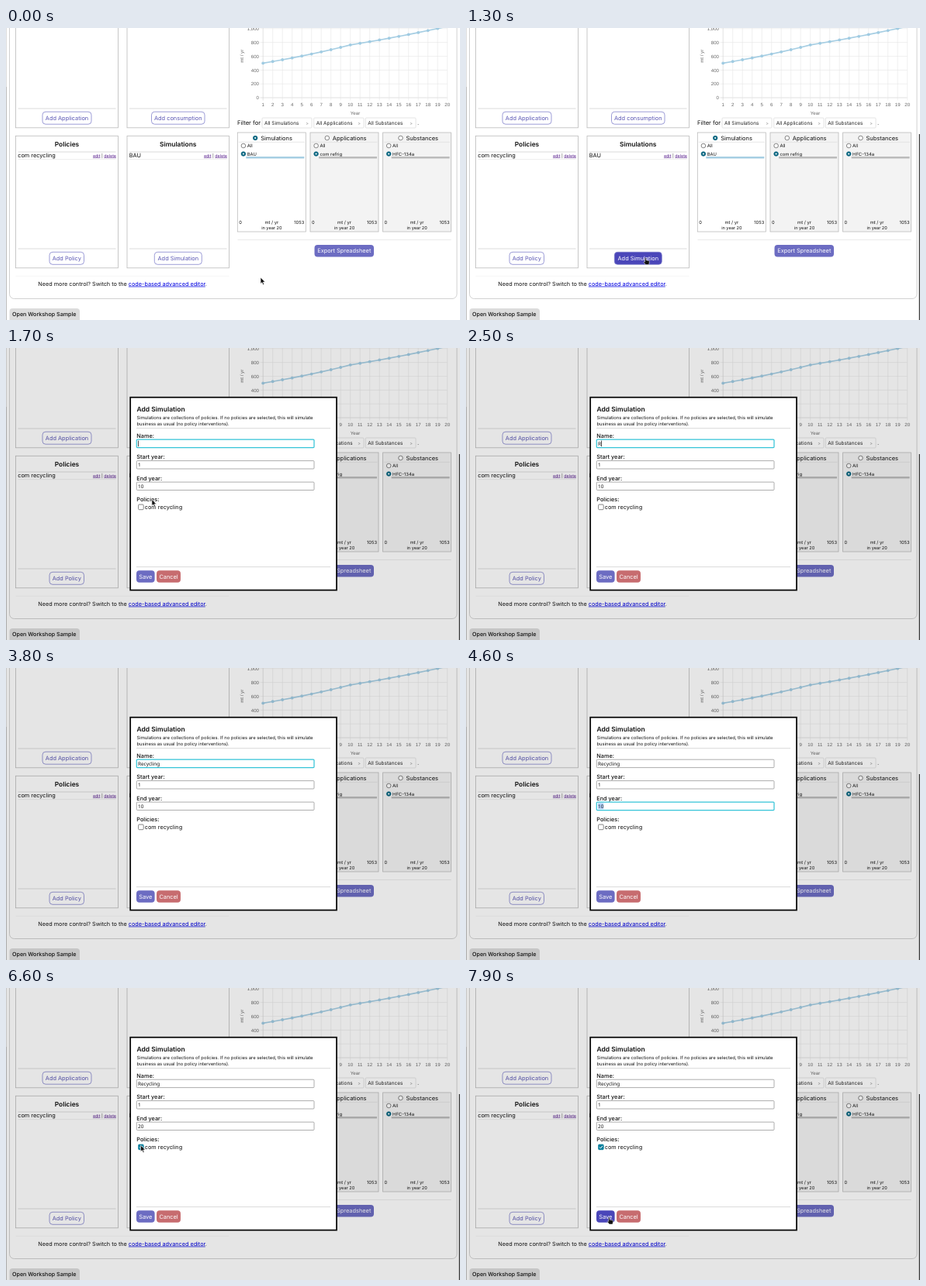
An HTML page that plays this animation: 585x377 px, repeating every 8000 ms.

```html
<!DOCTYPE html>
<html lang="en">
<head>
<meta charset="utf-8">
<title>Add Simulation</title>
<style>
html, body { margin: 0; width: 100%; height: 100%; overflow: hidden; background: #fff; }
svg { display: block; width: 585px; height: 377px; }
text { font-family: Inter, sans-serif; white-space: pre; text-rendering: geometricPrecision; }
.plot { font-family: 'Liberation Sans', Arial, sans-serif; }
.input { font-family: 'Noto Sans', sans-serif; }
</style>
</head>
<body>
<svg id="stage" viewBox="0 0 585 377" xmlns="http://www.w3.org/2000/svg"></svg>
<script>
const NS = 'http://www.w3.org/2000/svg';
const stage = document.getElementById('stage');
const LOOP = 8000;
const INDIGO = '#6c6cc2', DEEP = '#4a46b9', TEAL = '#0b6680', RING = '#35c4d8', EDGE = '#8c8c8c';
let layer = stage;

function el(name, attrs, parent = layer) {
  const node = document.createElementNS(NS, name);
  for (const key in attrs) node.setAttribute(key, attrs[key]);
  parent.appendChild(node);
  return node;
}

function group(parent = stage) {
  return layer = el('g', {}, parent);
}

function rect(x1, y1, x2, y2, attrs) {
  return el('rect', { x: x1, y: y1, width: x2 - x1, height: y2 - y1, ...attrs });
}

function line(x1, y1, x2, y2, stroke = '#ccc', width = 0.7) {
  return el('line', { x1, y1, x2, y2, stroke, 'stroke-width': width });
}

// y is the middle of the capitals
function label(str, x, y, size = 7.35, attrs = {}) {
  const node = el('text', { x, y: y + size * 0.36, 'font-size': size, fill: '#111', ...attrs });
  node.textContent = str;
  return node;
}

const MID = { 'text-anchor': 'middle' };
const END = { 'text-anchor': 'end' };
const show = (node, on) => node.setAttribute('visibility', on ? 'visible' : 'hidden');

function button(str, x1, y1, x2, y2, fill, ink, edge) {
  const box = rect(x1, y1, x2, y2, { rx: 4, fill, stroke: edge || 'none', 'stroke-width': 0.75 });
  const text = label(str, (x1 + x2) / 2, (y1 + y2) / 2, 7.4, { ...MID, fill: ink });
  return { box, text };
}

const outline = (str, x1, y1, x2, y2) => button(str, x1, y1, x2, y2, '#fff', '#5b57b4', '#7c7cca');

function radio(x, y, on) {
  el('circle', { cx: x, cy: y, r: 2.8, fill: on ? TEAL : '#fff', stroke: on ? TEAL : '#555', 'stroke-width': 0.7 });
  if (on) el('circle', { cx: x, cy: y, r: 1.1, fill: '#fff' });
}

// ---- page ----
function card(x1, y1, x2, y2) {
  rect(x1, y1, x2, y2, { fill: '#fff', stroke: '#bbb', 'stroke-width': 0.8 });
  line(x1 + 3, y2 - 24.8, x2 - 3, y2 - 24.8);
}

function listCard(x1, x2, title, item) {
  card(x1, 139.3, x2, 309.8);
  label(title, (x1 + x2) / 2, 149.7, 8.4, { ...MID, 'font-weight': 600 });
  line(x1 + 3, 160, x2 - 3, 160);
  label(item, x1 + 2.7, 164.6);
  const links = label('', x2 - 2.5, 164.6, 5.4, { ...END, fill: '#551a8b' });
  const ul = { 'text-decoration': 'underline' };
  el('tspan', ul, links).textContent = 'edit';
  el('tspan', { fill: '#333' }, links).textContent = ' | ';
  el('tspan', ul, links).textContent = 'delete';
  line(x1 + 3, 169.6, x2 - 3, 169.6, '#e8e8e8');
}

function chart() {
  const px = year => 331.2 + (year - 1) * 12.5;
  const py = v => 90 - v * 0.0892;
  const value = year => year <= 10 ? 500 * Math.pow(1.0482, year - 1) : 764 * Math.pow(1.0305, year - 10);
  const font = { class: 'plot', fill: '#666' };
  for (let v = 0; v <= 1000; v += 200) {
    line(327.5, py(v), px(20), py(v), v ? '#e6e6e6' : '#cfcfcf', 0.6);
    label(v.toLocaleString('en-US'), 326, py(v), 6.1, { ...font, ...END });
  }
  const pts = [];
  for (let year = 1; year <= 20; year++) {
    line(px(year), 0, px(year), 93.5, year > 1 ? '#e6e6e6' : '#cfcfcf', 0.6);
    label(year, px(year), 99, 6.1, { ...font, ...MID });
    pts.push([px(year), py(value(year))]);
  }
  label('Year', 450, 109.5, 6.1, { ...font, ...MID });
  label('mt / yr', 0, 0, 6.1, { ...font, ...MID, transform: 'translate(303.5 36.3) rotate(-90)' });
  el('polyline', { points: pts.join(' '), fill: 'none', stroke: '#a6cee3', 'stroke-width': 1.6 });
  for (const [cx, cy] of pts) el('circle', { cx, cy, r: 1.9, fill: '#a0cbe2' });
}

function filter(str, x1, x2) {
  rect(x1, 116, x2, 129, { rx: 1, fill: '#fff', stroke: '#ddd', 'stroke-width': 0.8 });
  label(str, x1 + 3, 122.5, 6.45, { fill: '#222' });
  label('>', x2 - 6, 122.7, 5.5, { ...MID, fill: '#888' });
}

function panel(x, title, item, tx, on) {
  const right = x + 88;
  rect(x, 135, right, 263, { fill: on ? '#fff' : '#f3f3f3', stroke: '#bbb', 'stroke-width': 0.8 });
  radio(tx - 7.5, 142, on);
  label(title, tx - 0.5, 141.8, 7.5);
  line(x + 1.5, 147.3, right - 1.5, 147.3, '#ddd');
  radio(x + 7.6, 152, false);
  label('All', x + 12.4, 152, 6);
  radio(x + 7.6, 162.5, true);
  label(item, x + 12.4, 162.6, 5.9);
  line(x + 11, 167.2, right - 2, 167.2, on ? '#a6cee3' : '#bbb', 2.6);
  label('0', x + 2, 251, 5.8);
  label('mt / yr', x + 44, 251, 5.8, MID);
  label('1053', right - 2, 251, 5.8, END);
  label('in year 20', x + 44, 258, 5.6, MID);
}

group();
rect(0, 0, 585, 377, { fill: '#fff' });
rect(4.5, -20, 581, 349.5, { rx: 6, fill: 'none', stroke: '#ccc', 'stroke-width': 0.9 });
card(12.5, -20, 144.5, 128.8);
card(156, -20, 287.5, 128.8);
outline('Add Application', 47, 108.2, 110, 124.2);
outline('Add consumption', 187.5, 108.2, 256, 124.2);
listCard(12.5, 144.5, 'Policies', 'com recycling');
listCard(156, 287.5, 'Simulations', 'BAU');
outline('Add Policy', 56, 289.3, 100.5, 305.3);
const addSim = outline('Add Simulation', 191.3, 289.3, 252.3, 305.3);
line(12.5, 320.3, 287.5, 320.3, '#f1f1f1');
const hint = label('Need more control? Switch to the ', 41.3, 330, 7.28);
el('tspan', { fill: '#0000e0', 'text-decoration': 'underline' }, hint).textContent = 'code-based advanced editor';
el('tspan', {}, hint).textContent = '.';
chart();
label('Filter for', 298, 122.5, 7.6);
filter('All Simulations', 330, 394);
filter('All Applications', 396.7, 461);
filter('All Substances', 463.3, 528);
label('.', 530, 122.5, 7.6);
panel(298.3, 'Simulations', 'BAU', 328.7, true);
panel(392, 'Applications', 'com refrig', 421.3, false);
panel(485.6, 'Substances', 'HFC-134a', 516, false);
line(298.5, 273.5, 573.5, 273.5, '#e2e2e2');
button('Export Spreadsheet', 397.5, 280, 474, 295.6, INDIGO, '#fff');
rect(4.5, 362, 95, 382, { rx: 4, fill: '#dcdcdc' });
label('Open Workshop Sample', 8, 369.3, 7.15, { 'font-weight': 500 });
line(0.3, 0, 0.3, 76, '#bbb', 0.6);
line(0.3, 76, 0.3, 377, '#777', 0.6);
const thumb = rect(583.7, 137, 585, 377, { fill: '#444' });

// ---- dialog ----
const dialog = group();
rect(0, 0, 585, 377, { fill: '#000', opacity: 0.1 });
const status = group(dialog);
rect(0, 367, 150, 377, { rx: 2, fill: '#a8a8a8' });
label('/#add-simulation', 148, 372.2, 6.3, { ...END, fill: '#f4f4f4' });
layer = dialog;
rect(160.2, 63.7, 426, 312.6, { fill: '#fff', stroke: '#000', 'stroke-width': 1.7 });
label('Add Simulation', 168.5, 79.2, 8.5, { 'font-weight': 600 });
label('Simulations are collections of policies. If no policies are selected, this will simulate', 168.5, 90.3, 5.86);
label('business as usual (no policy interventions).', 168.5, 97.4, 5.86);
line(168, 103.6, 418, 103.6);
line(168, 282.6, 418, 282.6);

function field(name, y) {
  label(name, 168.3, y - 10, 7.3, { 'font-weight': 500 });
  const box = rect(168.3, y - 5.2, 397, y + 5.2, { rx: 1, fill: '#fff' });
  const mark = rect(170, y - 4, 170, y + 4, { fill: '#b3d4fb' });
  const text = label('', 170, y - 0.1, 6.4, { class: 'input' });
  const caret = rect(170, y - 3.8, 170.7, y + 3.8, { fill: '#000' });
  return { box, mark, text, caret };
}

function setField(f, value, focus, selected, caretOn) {
  f.text.textContent = value;
  const width = value ? f.text.getComputedTextLength() : 0;
  f.box.setAttribute('stroke', focus ? RING : EDGE);
  f.box.setAttribute('stroke-width', focus ? 1.25 : 0.7);
  f.mark.setAttribute('width', focus && selected ? width : 0);
  f.caret.setAttribute('x', 170.2 + width);
  show(f.caret, focus && !selected && caretOn);
}

const nameField = field('Name:', 123.4);
const startField = field('Start year:', 150.8);
const endField = field('End year:', 178.3);
label('Policies:', 168.3, 195.6, 7.3, { 'font-weight': 500 });
const check = rect(170.6, 202.1, 177.2, 208.7, { rx: 1, 'stroke-width': 0.8 });
const tick = el('path', { d: 'M172 205.5l1.4 1.5 2.6-3.2', fill: 'none', stroke: '#fff', 'stroke-width': 1 });
label('com recycling', 178.8, 205.3, 7.3);
const save = button('Save', 168, 287.2, 191.6, 302.8, INDIGO, '#fff');
button('Cancel', 194, 287.2, 225, 302.8, '#c76c6f', '#fff');

// ---- pointer ----
const pointer = group();
const arrow = el('path', { d: 'M0 0V8.2L1.9 6.5 3.2 9.6 4.6 9 3.3 6H5.9Z', fill: '#111', stroke: '#fff', 'stroke-width': 0.6 });
const hand = el('path', {
  d: 'M0 0.6Q0.8-0.6 1.6 0.6V3.2L5 3.9Q6 4.2 5.9 5.4L5.2 9H0.9L-1.6 5.7Q-1.4 4.6 0 5.4Z',
  fill: '#111', stroke: '#fff', 'stroke-width': 0.5
});

const ease = p => p * p * (3 - 2 * p);
const ramp = (t, a, b) => Math.min(1, Math.max(0, (t - a) / (b - a)));
const within = (t, ...spans) => spans.some(([a, b]) => t >= a && t < b);

// start, end, from, to
const moves = [
  [550, 1250, [328, 322], [230.5, 296.5]],
  [1400, 1950, [229, 297], [157, 119]],
  [5700, 6300, [171, 165], [173.5, 203]],
  [6950, 7500, [173.5, 203], [180, 293]],
  [7820, 7900, [180, 293], [183.7, 296]]
];

function pointerAt(t) {
  let m = moves[0];
  for (const next of moves) if (t >= next[0]) m = next;
  const k = ease(ramp(t, m[0], m[1]));
  return m[2].map((v, i) => v + (m[3][i] - v) * k);
}

const keyTimes = [2500, 2600, 2800, 3100, 3200, 3300, 3400, 3500, 3600];
const typed = t => 'Recycling'.slice(0, keyTimes.filter(k => t >= k).length);

function mix(a, b, k) {
  const part = (c, i) => parseInt(c.substr(1 + i * 2, 2), 16);
  return `rgb(${[0, 1, 2].map(i => Math.round(part(a, i) + (part(b, i) - part(a, i)) * k))})`;
}

function draw(t) {
  const open = t >= 1400;
  const hover = open ? 0 : ramp(t, 1090, 1280);
  addSim.box.setAttribute('fill', mix('#ffffff', DEEP, hover));
  addSim.text.setAttribute('fill', mix('#5b57b4', '#ffffff', hover));
  show(thumb, within(t, [600, 3400], [4400, 5900], [6500, LOOP]));
  dialog.style.display = open ? '' : 'none';

  if (open) {
    status.setAttribute('opacity', 0.6 * (1 - ramp(t, 1490, 1650)));
    const focus = t < 4100 ? 1 : t < 4500 ? 2 : t < 6600 ? 3 : 0;
    const caretOn = within(t, [1400, 1900], [2500, 3800], [5200, 5900], [6300, 6600]);
    const years = t < 5200 ? '10' : t < 5300 ? '2' : '20';
    setField(nameField, typed(t), focus === 1, false, caretOn);
    setField(startField, '1', focus === 2, true, caretOn);
    setField(endField, years, focus === 3, t < 5200, caretOn);
    const checked = t >= 6600;
    check.setAttribute('fill', checked ? '#0a7f9c' : '#fff');
    check.setAttribute('stroke', checked ? '#0a7f9c' : '#666');
    show(tick, checked);
    save.box.setAttribute('fill', t >= 7900 ? DEEP : INDIGO);
  }

  const [x, y] = pointerAt(t);
  const onButton = within(t, [1150, 1400], [7900, LOOP]);
  pointer.setAttribute('transform', `translate(${x} ${y})`);
  pointer.style.display = within(t, [2500, 5800]) ? 'none' : '';
  show(arrow, !onButton);
  show(hand, onButton);
}

const begin = performance.now();
function loop() {
  draw((performance.now() - begin) % LOOP);
  requestAnimationFrame(loop);
}
loop();
</script>
</body>
</html>
```
